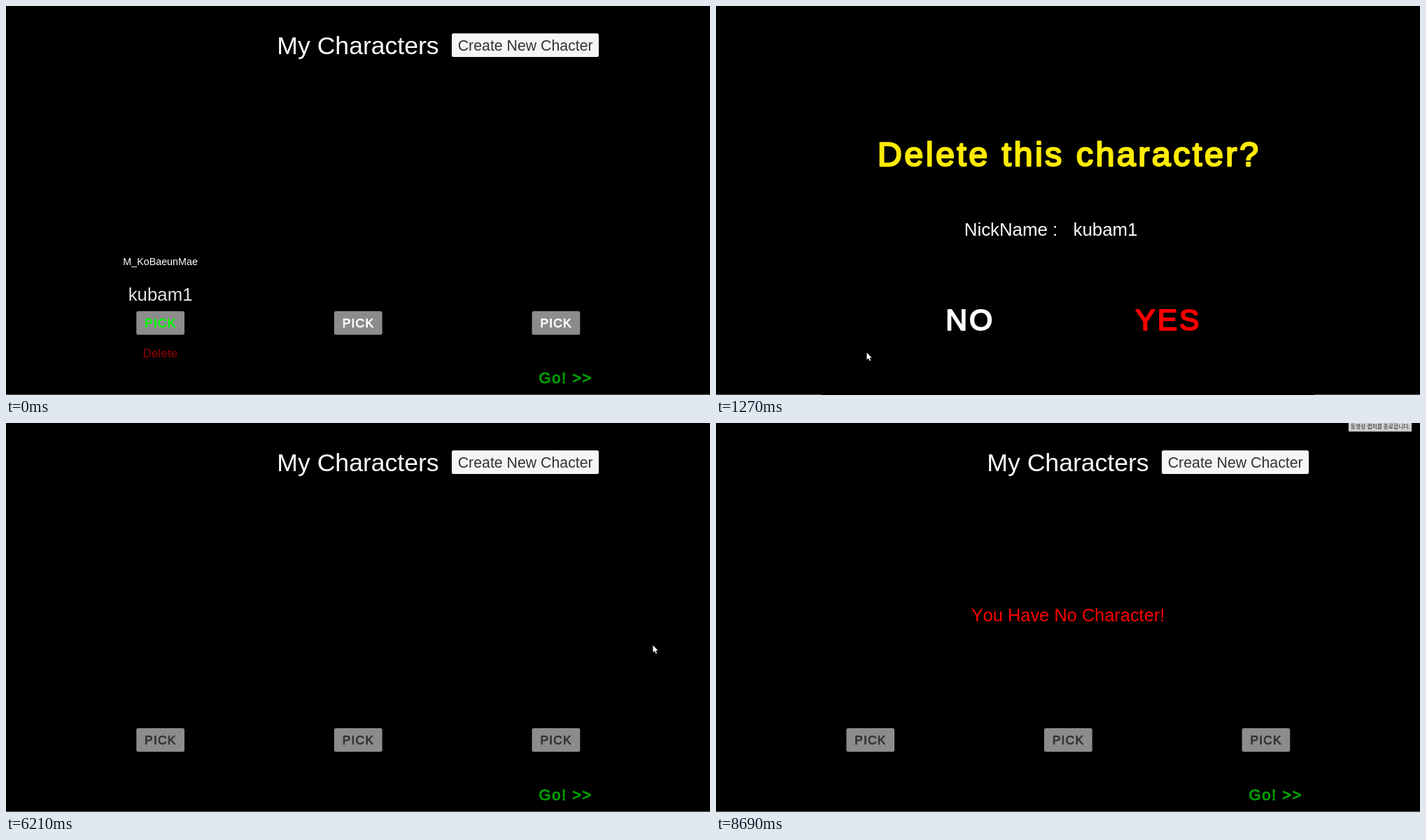
An HTML page for the animation above (8780 ms loop, 1006 by 557 pixels).

```html
<!DOCTYPE html>
<html lang="en">
<head>
<meta charset="utf-8">
<title>My Characters</title>
<style>
  html, body { margin: 0; width: 100%; height: 100%; overflow: hidden; background: #000; }
  svg { display: block; width: 100%; height: 100%; }
  text { font-family: "Liberation Sans", Arial, sans-serif; font-kerning: none; fill: currentColor; white-space: pre; }
  .mid { text-anchor: middle; }
  .bold { letter-spacing: .07em; stroke: currentColor; stroke-width: .048em; stroke-linejoin: round; }
  .pick rect { fill: #8c8c8c; }
  .pick text { font-size: 17.4px; }
  .pick:first-child { color: #0f0; }
  .off .pick { color: #323232; }
  #tip text { font: 7.85px "Noto Sans CJK KR", "Noto Sans CJK", sans-serif; }
</style>
</head>
<body>
<svg viewBox="0 0 1006 557" color="#fff">
  <rect width="1006" height="557"/>
  <rect y="556" width="1006" height="1" fill="#5c5c5c"/>

  <text class="mid" x="503" y="69" font-size="35.6">My Characters</text>
  <rect x="637" y="39.3" width="210" height="33.6" rx="2.5" fill="#f5f5f5"/>
  <text class="mid" x="742.2" y="63.7" font-size="21.3" color="#323232">Create New Chacter</text>
  <g id="picks"></g>
  <text class="bold" x="761.5" y="540" font-size="22" color="#00a000">Go! &gt;&gt;</text>

  <g id="hero">
    <text class="mid" x="220.6" y="371" font-size="14.3">M_KoBaeunMae</text>
    <text class="mid" x="220.6" y="422" font-size="25.8" color="#e3e3e3">kubam1</text>
    <text class="mid" x="220.5" y="503.4" font-size="17.3" color="#960000">Delete</text>
  </g>

  <g id="dialog">
    <rect x="150" width="706" height="557"/>
    <text class="bold" x="230.8" y="228.7" font-size="48.6" color="#ffeb04">Delete this character?</text>
    <text x="354.8" y="329" font-size="25.8">NickName :</text>
    <text x="510.6" y="329" font-size="25.8">kubam1</text>
    <text class="bold" x="328.2" y="464" font-size="42.6">NO</text>
    <text class="bold" x="599.3" y="464" font-size="42.6" color="#f00">YES</text>
  </g>

  <text id="warn" class="mid" x="503" y="284" font-size="25.4" color="#f00">You Have No Character!</text>

  <g id="tip">
    <rect x="904" width="90" height="12" fill="#d2d2d2"/>
    <path d="M904 12H994" stroke="#9a9a9a"/>
    <text x="906.8" y="7.8" color="#222">동영상 캡처를 종료합니다.</text>
  </g>

  <path id="cursor" d="M.5 .3V10.5L2.9 8.3L4.7 12.3L6.2 11.6L4.5 7.8H7.6Z" fill="#fff" stroke="#000" stroke-width=".8" paint-order="stroke"/>
</svg>
<script>
  const LOOP = 8780, OPEN = 1270, CLOSE = 5240, WARN = 7210, TIP = 8690;
  const get = id => document.getElementById(id);
  const [picks, hero, dialog, warn, tip, cursor] =
    ["picks", "hero", "dialog", "warn", "tip", "cursor"].map(get);

  for (let i = 0; i < 3; i++) {
    picks.innerHTML += `<g class="pick" transform="translate(${186.3 + 282.65 * i} 437)">
      <rect width="68.7" height="33.7" rx="2.5"/>
      <text class="bold" x="11.8" y="23">PICK</text></g>`;
  }

  // The pointer enters from above, then follows one curve per move.
  const entry = [826, -54];
  const moves = [
    { from: 200, to: 400, steps: 3, bend: [848, 116], end: [871, 285] },
    { from: 600, to: 1080, steps: 6, bend: [400, 545], end: [215, 496] },
    { from: 1560, to: 2250, steps: 8, bend: [750, 280], end: [653, 457] },
    { from: 5640, to: 6210, steps: 7, bend: [790, 360], end: [924, 318] },
    { from: 8010, to: 8300, steps: 4, bend: [938, 146], end: [916, -26] }
  ];

  const smooth = u => u * u * (3 - 2 * u);
  const curve = (a, b, c, u) =>
    a.map((p, i) => p * (1 - u) ** 2 + 2 * b[i] * u * (1 - u) + c[i] * u * u);

  function pointer(t) {
    let at = entry;
    for (const { from, to, steps, bend, end } of moves) {
      if (t < from) break;
      const gap = (to - from) / (steps - 1);
      const step = Math.floor((t - from) / gap + 1e-6) + 1;
      at = curve(at, bend, end, smooth(Math.min(1, step / steps)));
    }
    return at.map(Math.round);
  }

  const show = (el, on) => { el.style.display = on ? "" : "none"; };

  function draw(t) {
    show(hero, t < OPEN);
    show(dialog, t >= OPEN && t < CLOSE);
    picks.classList.toggle("off", t >= CLOSE);
    show(warn, t >= WARN);
    show(tip, t >= TIP);
    cursor.setAttribute("transform", `translate(${pointer(t)})`);
  }

  const start = performance.now();
  function tick() {
    draw((performance.now() - start) % LOOP);
    requestAnimationFrame(tick);
  }
  tick();
</script>
</body>
</html>
```
